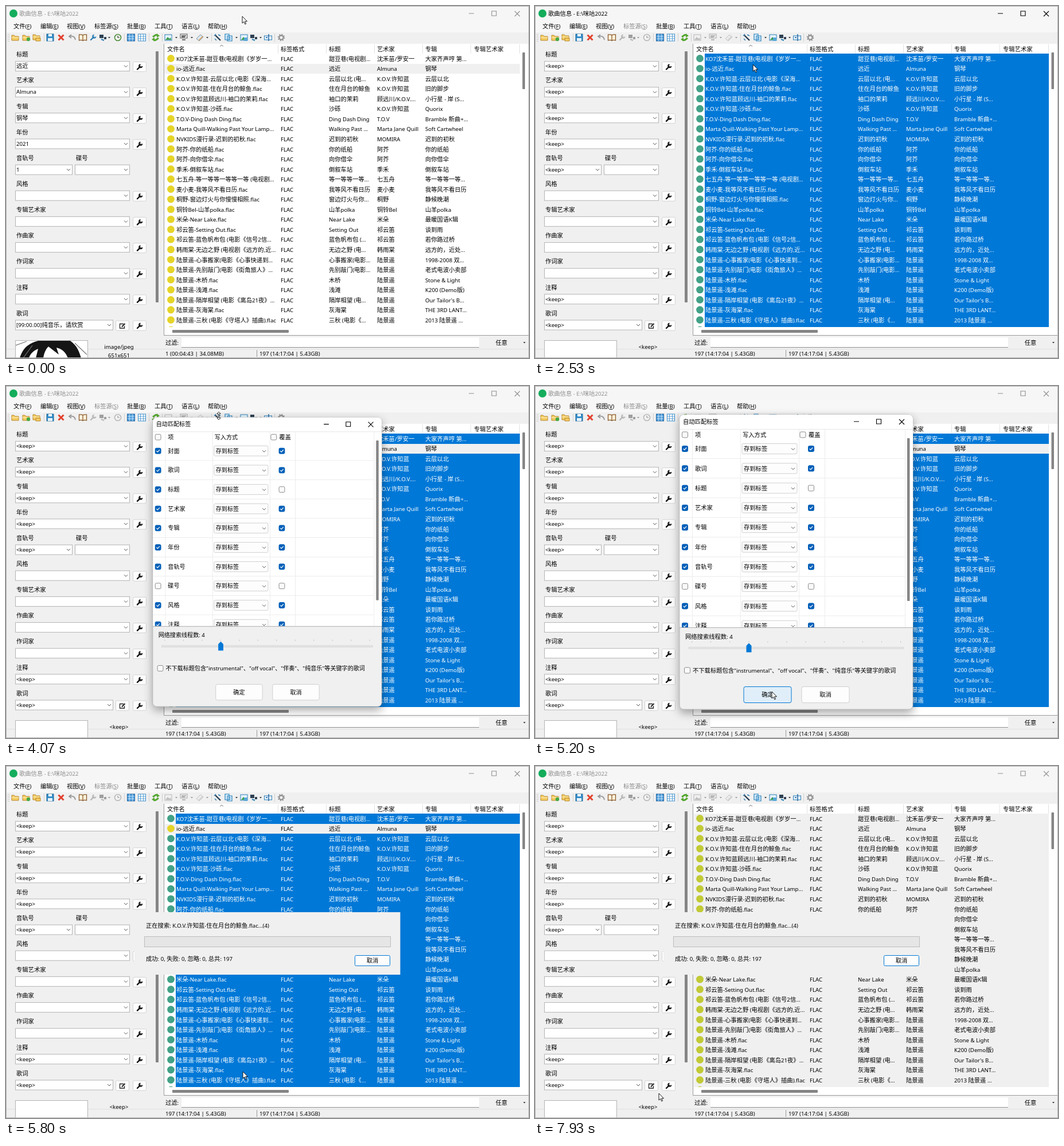
An HTML page for the animation above (8 s loop, 912 by 614 pixels).

```html
<!DOCTYPE html>
<html lang="zh">
<head>
<meta charset="utf-8">
<title>歌曲信息</title>
<style>
html,body{margin:0;width:100%;height:100%;overflow:hidden;background:#f0f0f0}
svg{display:block;width:912px;height:614px}
text{font:10.3px "Noto Sans CJK SC","Noto Sans CJK","Noto Sans",sans-serif;white-space:pre;fill:currentColor}
.l{font-family:"Noto Sans",sans-serif;font-size:9.65px}
.u{text-decoration:underline}
.mid{text-anchor:middle}
.bg{fill:none;shape-rendering:crispEdges}
.bg.sel{fill:#0078d7}
.bg.dim{fill:#f0f0f0;x:277px;width:619px}
.row{color:#000}
.row.sel{color:#fff}
.dot{fill:#e6d428}
.late .dot{fill:#c2ca35}
.sel .dot{fill:#43a287}
.off .can{filter:grayscale(1);opacity:.45}
.box{fill:#fdfdfd;stroke:#cfcfcf}
.hot{fill:#e0eef9;stroke:#0078d4}
.down{fill:#cce4f7;stroke:#005499}
</style>
</head>
<body>
<svg id="stage" viewBox="0 0 912 614" xmlns="http://www.w3.org/2000/svg"></svg>
<script>
const BLUE = '#0078d7';
const esc = s => s.replace(/&/g, '&amp;').replace(/</g, '&lt;').replace(/>/g, '&gt;');
const rect = (x, y, w, h, fill, more = '') => `<rect x="${x}" y="${y}" width="${w}" height="${h}" fill="${fill}" ${more}/>`;
const path = (d, stroke, width = 1, fill = 'none', more = '') => `<path d="${d}" stroke="${stroke}" stroke-width="${width}" fill="${fill}" ${more}/>`;
const group = (x, y, body, more = '') => `<g transform="translate(${x} ${y})" ${more}>${body}</g>`;
// y is the middle of the line; Latin runs get their own size
const text = (x, y, s, more = '') => `<text x="${x}" y="${y + 3.7}" ${more}>` +
  s.replace(/[ -~]+/g, m => `<tspan class="l">${esc(m)}</tspan>`)
   .replace(/_(\w)/, '<tspan class="u">$1</tspan>') + '</text>';
const framed = (x, y, w, h, more = '') => rect(x + .5, y + .5, w - 1, h - 1, '#fff', 'stroke="#b4b4b4" ' + more);
const chevron = (x, y, c = '#555') => group(x, y, path('M-3-1.5L0 1.5L3-1.5', c));
const caret = x => group(x, 55, path('M-2-1H2L0 1.4Z', 'none', 0, '#333'));
const winButtons = (x, gap, y) => path(
  `M${x} ${y}h9M${x + gap} ${y - 4}h8v8h-8ZM${x + 2 * gap} ${y - 4}l9 9m0-9l-9 9`, 'currentColor', 1.1);
const wrench = c => path('M-4 4L1-1', c, 2.4, 'none', 'stroke-linecap="round"') +
  path('M1.5-4.4A2.6 2.6 0 1 0 4.4-1.5', c, 2);

// ---------- song list ----------
const K = 'K.O.V.许知蓝', L = '陆景遥', Q = '祁云笛';
const songs = [
  ['KO7沈禾苗-甜豆巷(电视剧《岁岁一...', '甜豆巷(电视剧...', '沈禾苗/罗安一', '大家齐声哼 第...'],
  ['io-远近.flac', '远近', 'Almuna', '钢琴'],
  [K + '-云层以北 (电影《深海...', '云层以北 (电...', K, '云层以北'],
  [K + '-住在月台的鲸鱼.flac', '住在月台的鲸鱼', K, '旧的脚步'],
  [K + '顾远川-袖口的茉莉.flac', '袖口的茉莉', '顾远川/K.O.V....', '小行星 - 岸 (S...'],
  [K + '-沙砾.flac', '沙砾', K, 'Quorix'],
  ['T.O.V-Ding Dash Ding.flac', 'Ding Dash Ding', 'T.O.V', 'Bramble 新曲+...'],
  ['Marta Quill-Walking Past Your Lamp...', 'Walking Past ...', 'Marta Jane Quill', 'Soft Cartwheel'],
  ['NVKIDS漫行录-迟到的初秋.flac', '迟到的初秋', 'MOMIRA', '迟到的初秋'],
  ['阿芥-你的纸船.flac', '你的纸船', '阿芥', '你的纸船'],
  ['阿芥-向你借伞.flac', '向你借伞', '阿芥', '向你借伞'],
  ['季禾-倒叙车站.flac', '倒叙车站', '季禾', '倒叙车站'],
  ['七五舟-等一等等一等等一等 (电视剧...', '等一等等一等...', '七五舟', '等一等等一等...'],
  ['麦小麦-我等风不看日历.flac', '我等风不看日历', '麦小麦', '我等风不看日历'],
  ['桐野-窗边灯火与你慢慢相照.flac', '窗边灯火与你...', '桐野', '静候晚潮'],
  ['铜铃Bel-山羊polka.flac', '山羊polka', '铜铃Bel', '山羊polka'],
  ['米朵-Near Lake.flac', 'Near Lake', '米朵', '最暖国语K辑'],
  [Q + '-Setting Out.flac', 'Setting Out', Q, '谈到雨'],
  [Q + '-蓝色帆布包 (电影《信号2信...', '蓝色帆布包 (...', Q, '若你路过桥'],
  ['韩雨棠-无边之野 (电视剧《远方的,近...', '无边之野 (电...', '韩雨棠', '远方的，近处...'],
  [L + '-心事搬家(电影《心事快递到...', '心事搬家(电影...', L, '1998-2008 双...'],
  [L + '-先别敲门(电影《街角旅人》...', '先别敲门(电影...', L, '老式电波小卖部'],
  [L + '-木桥.flac', '木桥', L, 'Stone & Light'],
  [L + '-浅滩.flac', '浅滩', L, 'K200 (Demo版)'],
  [L + '-隔岸相望 (电影《离岛21夜》...', '隔岸相望 (电...', L, "Our Tailor's B..."],
  [L + '-灰海棠.flac', '灰海棠', L, 'THE 3RD LANT...'],
  [L + '-三秋 (电影《守塔人》插曲).flac', '三秋 (电影《...', L, '2013 ' + L + ' ...'],
  ['', '', '', '']
];
const STEP = 17.54, rowY = i => 92 + STEP * i;

function songList() {
  const cols = [281, 479, 563, 647, 731, 816];
  const heads = ['文件名', '标签格式', '标题', '艺术家', '专辑', '专辑艺术家'];
  let bgs = '', rows = '';
  songs.forEach(([file, ...rest], i) => {
    const y = rowY(i);
    bgs += `<rect class="bg" x="296" y="${y - 8.8}" width="600" height="${STEP}"/>`;
    const cells = file ? ['FLAC', ...rest].map((s, c) => text(cols[c + 1], y, s)).join('') : '';
    rows += `<g class="row"><circle class="dot" cx="287.5" cy="${y - .5}" r="6.4"/>${text(297, y, file)}${cells}</g>`;
  });
  return rect(276, 66, 636, 509, '#fff') + path('M275.5 66V574.5H911', '#9a9a9a') +
    heads.map((s, i) => text(cols[i], 75, s)).join('') +
    path('M474.5 67V83M558.5 67V83M642.5 67V83M726.5 67V83M810.5 67V83M895.5 67V83', '#e2e2e2') +
    path('M373 70.5l3-2.5l3 2.5', '#777') +
    `<g clip-path="url(#listClip)"><g id="bgs">${bgs}</g>` +
    rect(277, 0, 198, STEP, '#d9ecfb', 'id="hover"') + `<g id="rows">${rows}</g></g>` +
    `<g id="edit">${rect(297.5, 102, 62, 15, '#fff', 'stroke="#555"')}${rect(299, 103.5, 35, 12, BLUE)}` +
    `<g color="#fff">${text(298, 109.5, 'io-远近')}</g>${text(333, 109.5, '.flac')}</g>` +
    rect(900.5, 81, 4.5, 64, '#858585', 'rx="1"') + rect(290, 565, 203, 5, '#858585', 'rx="1"');
}

// ---------- left panel ----------
const fieldY = i => 104.5 + 45.15 * i;
function panel() {
  const labels = ['标题', '艺术家', '专辑', '年份', '音轨号', '风格', '专辑艺术家', '作曲家', '作词家', '注释', '歌词'];
  const single = ['远近', 'Almuna', '钢琴', '2021', '1', '', '', '', '', '', '[99:00.00]纯音乐，请欣赏'];
  const kept = [0, 1, 2, 3, 4, 9, 10];
  const button = (x, y, body) => rect(x + .5, y - 8, 23, 17, '#fdfdfd', 'rx="2" stroke="#d3d3d3"') + group(x + 12, y + 1, body);
  const combo = (x, y, w) => framed(x, y - 8.5, w, 18) + chevron(x + w - 7, y + .5);
  let s = '', one = '', many = '';
  labels.forEach((name, i) => {
    const y = fieldY(i);
    s += text(18, y - 20, name) + combo(16, y, i == 4 ? 100 : i == 10 ? 171 : 200);
    if (i == 4) s += text(122, y - 20, '碟号') + combo(120, y, 96);
    else s += button(221, y + 1, wrench('#111'));
    one += text(18, y, single[i]);
    if (kept.includes(i)) many += text(18, y, '<keep>');
  });
  s += button(191, fieldY(10) + 1, path('M2-3.5H-4.5V4H3.5V0', '#222', 1.3) + path('M-1 1.5L4.5-4', '#222', 2));
  s += framed(16, 583, 127, 40);
  one += '<g clip-path="url(#coverClip)">' +
    path('M24 614C30 594 42 588 56 584H112C124 592 128 604 131 614H108C104 604 98 598 88 596L92 608L74 594C68 600 66 608 65 614H52L56 598C46 602 42 608 40 614Z', 'none', 0, '#151515') +
    path('M17 592L36 585M120 588L141 608M30 614L46 592', '#777', 1.2) + '</g>' +
    text(197, 594, 'image/jpeg', 'class="mid"') + text(197, 609, '651x651', 'class="mid"') + text(278, 606, '1 (00:04:43 | 34.08MB)');
  many += text(197, 594, '<keep>', 'class="mid"') + text(278, 606, '197 (14:17:04 | 5.43GB)');
  return s + `<g id="one">${one}</g><g id="many">${many}</g>` + rect(261, 79, 5, 438, '#858585', 'rx="1"');
}

// ---------- title, menu, toolbar, status ----------
function chrome() {
  const menus = [[13, '文件(_F)'], [60, '编辑(_E)'], [106, '视图(_V)'], [154, '标签源(_S)'], [211, '批量(_B)'],
    [259, '工具(_T)'], [306, '语言(_L)'], [352, '帮助(_H)']];
  const folder = path('M-6-4H-2L0-2H6V5H-6Z', '#b8862b', 1, '#f4cd62') + path('M-6 0H6', '#fff2c4');
  const grid = (bg, c) => rect(-6.5, -6, 13, 12, bg, `stroke="${c}"`) +
    path('M-6-2H6M-6 2H6M-2.5-6V6M2.5-6V6', bg == '#fff' ? c : '#d8ebfb', .8);
  const picture = rect(-6, -5, 12, 10, '#e7f4fd', 'stroke="#2d7fb5"') + path('M-5 4L-1-1L2 2L4 0L5 4Z', 'none', 0, '#3f9d52');
  const flags = path('M-7-5H0V1H-7ZM1-1H5V3H1Z', 'none', 0, '#2f4254') + path('M-4 3L1 5', '#2d7fb5', 2);
  const pages = path('M-6-6H1V4H-6ZM-2-3H6V6H-2Z', '#2580bd', 1.2, '#dff0fb') + path('M0 0H4M0 3H4', '#2580bd');
  const icons = [
    [16, folder], [35, folder + `<circle cx="4" cy="3" r="3.2" fill="#45a845"/>`],
    [54, group(-1, -1, folder) + path('M-2 1H6V6H-2Z', '#b8862b', 1, '#f4cd62')],
    [77, rect(-6, -6, 12, 12, '#358dc9', 'stroke="#1c6797"') + rect(-3, -6, 6, 4, '#fff') + rect(-4, 1, 8, 5, '#e6f2fa')],
    [96, path('M-4.5-4.5L4.5 4.5M4.5-4.5L-4.5 4.5', '#e2412d', 3)],
    [115, path('M6 4C5-2 1-3-4-2M-1-5L-5-2L-1 1', '#9a9a9a', 1.8)],
    [134, path('M0-4C-2-6-5-5-6.5-5V5C-4 4-2 4 0 5.5C2 4 4 4 6.5 5V-5C5-5 2-6 0-4ZV5', '#8a5a2c', 1.3, '#fff3dc')],
    [152, wrench('#2d7fb5'), 1], [170, flags, 1],
    [195, `<circle r="5.5" fill="#f2f8ee" stroke="#4d8a3c" stroke-width="1.6"/>` + path('M0-3V0H3', '#333', 1.2), 1],
    [218, grid('#4d9ddb', '#1b5f9e')], [237, grid('#fff', '#3a8ecb')],
    [261, path('M-5-1L0-4.5H3M5 1L0 4.5H-3', '#55a630', 3) + path('M2-7L7-3L2 0ZM-2 7L-7 3L-2 0Z', 'none', 0, '#55a630')],
    [283, picture, 1],
    [310, rect(-6, -6, 12, 7, '#eee', 'stroke="#555"') + path('M-4-3H4M-4-1H2M-3 4H3', '#444', 1.4), 1],
    [338, path('M-6 2L1-5L6-1L-1 6Z', '#7b8fa2', 1, '#dbe8f2') + path('M-2 5L5-2', '#e09a4d', 1.5), 1],
    [369, path('M-4-4L5 5', '#2b3d50', 2.4) + path('M-5 2L-2 5M1-5L5-3M-6-3L-3-6', '#2d7fb5', 1.4)],
    [388, pages], [415, picture + rect(0, 0, 6, 6, '#58a8d8')], [433, flags],
    [457, rect(-6.5, -3, 13, 7, '#e7f4fd', 'stroke="#2d7fb5"') + path('M1-6V6M-4 0H-1', '#1b5f9e', 1.4)],
    [480, `<circle r="3.6" fill="none" stroke="#888" stroke-width="2"/><circle r="5.4" fill="none" stroke="#888" stroke-width="1.6" stroke-dasharray="2.1 2.1"/>`]
  ];
  return rect(0, 0, 912, 25, '#f6f6f6') + `<circle cx="13" cy="13" r="7" fill="#14ad5c"/>` +
    `<g id="title">${text(23, 13, '歌曲信息 - E:\\咪咕2022')}${winButtons(807, 40, 13)}</g>` +
    rect(0, 25, 912, 21, '#f7f7f7') + menus.map(([x, s], i) => text(x, 35.5, s, i == 3 ? 'class="can"' : '')).join('') +
    path('M3.5 49V62M5.5 49V62', '#b5b5b5', 1, 'none', 'stroke-dasharray="1 2"') +
    path('M66.5 48V62M206.5 48V62M249.5 48V62M272.5 48V62M358.5 48V62M468.5 48V62', '#d0d0d0') +
    rect(360.5, 46.5, 18, 17, '#bfdef5', `stroke="${BLUE}" id="press"`) +
    icons.map(([x, body, can]) => group(x, 55, body, can ? 'class="can"' : '')).join('') +
    [180, 297, 324, 351].map(x => `<g class="can">${caret(x)}</g>`).join('') + caret(402) + caret(444) +
    text(278, 587, '过滤:') + rect(306, 578, 519, 17, '#fff') + path('M306 595.5H825', '#8d8d8d') +
    text(864, 587, '任意', 'class="mid"') + group(904, 587, path('M-2-1H2L0 1.5Z', 'none', 0, '#333')) +
    path('M0 598.5H912', '#e0e0e0') + text(442, 606, '197 (14:17:04 | 5.43GB)') + path('M437.5 600V612', '#999');
}

// ---------- dialogs ----------
const itemY = i => 109.5 + 34.3 * i;
function matchDialog() {
  const check = (x, y, on) => rect(x - 5, y - 5, 10, 10, on ? '#005fb8' : '#fafafa', `rx="2" stroke="${on ? '#005fb8' : '#8a8a8a'}"`) +
    (on ? path(`M${x - 2.8} ${y}l2 2l3.6-4`, '#fff', 1.2) : '');
  const items = ['封面', '歌词', '标题', '艺术家', '专辑', '年份', '音轨号', '碟号', '风格', '注释'];
  const rows = items.map((s, i) => {
    const y = itemY(i);
    return path(`M252 ${y + 17}H645`, '#ececec') + check(261.5, y, i != 7) + text(279, y, s) +
      `<rect class="box" x="361" y="${y - 9}" width="96" height="18" rx="2"/>` + text(364, y, '存到标签') +
      chevron(450, y + .5) + check(481.5, y, i != 2 && i != 7);
  }).join('');
  const ticks = Array.from({length: 12}, (_, i) => `M${273.5 + 33.1 * i} 445v2.5`).join('');
  const button = (x, s) => `<rect class="box" x="${x}" y="524.5" width="83" height="28" rx="3"/>` + text(x + 41.5, 538.5, s, 'class="mid"');
  return rect(252, 50, 407, 514, '#f0f0f0', 'rx="7" filter="url(#shade)" stroke="#9b9b9b" stroke-width=".7"') +
    path('M252.5 421V57a7 7 0 0 1 7-7H652a7 7 0 0 1 7 7V421Z', 'none', 0, '#fff') +
    text(258, 62, '自动匹配标签') + winButtons(556, 39.5, 62) +
    path('M252 75.5H659', '#e6e6e6') + path('M274.5 76V421M358.5 76V421M460.5 76V421M505.5 76V421M645.5 76V421', '#ececec') +
    check(261.5, 85, 0) + text(279, 85, '项') + text(362, 85, '写入方式') + check(467, 85, 0) + text(477, 85, '覆盖') +
    `<g id="items" clip-path="url(#itemClip)">${rows}</g>` + rect(649, 91, 4.5, 284, '#858585', 'rx="1"') +
    path('M252 421.5H659', '#b0b0b0') + text(262, 437, '网络搜索线程数: 4') +
    path(ticks, '#c4c4c4') + rect(268, 455.5, 375, 3, '#e3e3e3', 'stroke="#d2d2d2" stroke-width=".6"') +
    path('M368.5 464.5V453L373 448.5L377.5 453V464.5Z', 'none', 0, BLUE) +
    check(265.5, 496, 0) + text(275, 496, '不下载标题包含"instrumental"、"off vocal"、"伴奏"、"纯音乐"等关键字的歌词') +
    `<g id="ok">${button(364, '确定')}</g>` + button(465, '取消');
}
function searchDialog() {
  return rect(224, 255, 463.5, 109, '#f0f0f0') + text(244, 278, `正在搜索: ${songs[3][0]}...(4)`) +
    rect(241.5, 297.5, 429, 18, '#e6e6e6', 'stroke="#bcbcbc"') + text(244, 336, '成功: 0, 失败: 0, 忽略: 0, 总共: 197') +
    rect(608.5, 330.5, 61, 18, '#fdfdfd', `rx="2" stroke="${BLUE}"`) + text(639, 339.5, '取消', 'class="mid"');
}

const stage = document.getElementById('stage');
const clip = (id, x, y, w, h) => `<clipPath id="${id}">${rect(x, y, w, h, '#000')}</clipPath>`;
stage.innerHTML = '<defs><filter id="shade" x="-20%" y="-20%" width="140%" height="140%">' +
  '<feDropShadow dx="0" dy="6" stdDeviation="8" flood-opacity=".35"/></filter>' +
  clip('listClip', 276, 83, 621, 477) + clip('coverClip', 17, 584, 125, 30) + clip('itemClip', 252, 76, 393, 345) + '</defs>' +
  rect(0, 0, 912, 614, '#f0f0f0') + `<g id="main">${chrome()}${songList()}${panel()}</g>` +
  rect(.5, .5, 911, 613, 'none', 'stroke="#b3b3b3"') +
  `<g id="tip">${rect(373.5, 75.5, 82, 16, '#f9f9f9', 'stroke="#d0d0d0" rx="2"')}<g color="#555">${text(378, 83.5, '自动匹配标签(A)')}</g></g>` +
  `<g id="match">${matchDialog()}</g><g id="search">${searchDialog()}</g>` +
  `<g id="arrow">${path('M0 0V12L2.8 9.4L4.8 13.8L6.6 13L4.7 8.8H8.5Z', '#000', .9, '#fff')}</g>` +
  `<g id="resize">${path('M0-7L3.2-3.6H.9V3.6H3.2L0 7L-3.2 3.6H-.9V-3.6H-3.2Z', '#000', .8, '#fff')}</g>`;

// ---------- motion ----------
const $ = id => document.getElementById(id);
const bgs = [...$('bgs').children], rows = [...$('rows').children];
const combos = [...$('items').querySelectorAll('.box')], okBox = $('ok').firstChild;
const track = [[0, 412, 18], [470, 412, 18], [800, 404, 60], [1050, 390, 98], [1270, 381, 114], [2400, 381, 114],
  [2870, 378, 71], [3070, 373, 52], [3270, 369, 46], [4400, 370, 46], [4650, 373, 130], [5000, 402, 440], [5200, 413, 533],
  [6530, 413, 533], [6600, 412, 534], [6800, 412, 534], [7200, 385, 555], [7600, 335, 560], [7930, 216, 571], [8000, 216, 571]];
const clamp = v => Math.max(0, Math.min(1, v));
const within = (t, a, b) => t >= a && t < b;
const show = (id, on) => $(id).style.display = on ? '' : 'none';

function cursorAt(t) {
  const i = track.findIndex(k => k[0] > t);
  const [t0, x0, y0] = track[i - 1], [t1, x1, y1] = track[i];
  const p = (t - t0) / (t1 - t0);
  return [x0 + (x1 - x0) * p, y0 + (y1 - y0) * p];
}
// open and close like a system window: grow in, shrink out
function popup(id, t, open, close, cx, cy, grow) {
  show(id, within(t, open, close));
  const left = 1 - clamp((t - open) / grow), out = clamp((t - close + 60) / 60);
  const k = 1 - .07 * left ** 3 - .05 * out;
  $(id).setAttribute('transform', `translate(${cx} ${cy}) scale(${k}) translate(${-cx} ${-cy})`);
  $(id).setAttribute('opacity', Math.min(1, .4 + 2 * (1 - left)) * (1 - .6 * out));
}
function rowState(i, t) {
  if (t >= 5930) return 'dim';
  if (t >= 2070) return i == 1 && t >= 4000 ? 'dim' : 'sel';
  return i != 1 ? '' : t >= 1330 ? 'sel' : 'dim';
}
function draw(t) {
  const [x, y] = cursorAt(t), all = t >= 2070;
  $('title').setAttribute('color', within(t, 1330, 3870) || within(t, 5470, 5670) ? '#000' : '#8f8f8f');
  $('main').setAttribute('class', all ? 'off' : '');
  $('rows').setAttribute('class', t >= 5930 ? 'late' : '');
  rows.forEach((row, i) => {
    const state = rowState(i, t);
    row.setAttribute('class', 'row ' + state);
    bgs[i].setAttribute('class', 'bg ' + state);
  });
  show('one', !all);
  show('many', all);
  show('hover', t < 1330 && y > 83);
  $('hover').setAttribute('y', rowY(Math.round((y - 92) / STEP)) - 8.8);
  show('edit', within(t, 3270, 4000));
  show('press', within(t, 3270, 4000));
  show('tip', within(t, 3470, 4000));
  $('tip').setAttribute('opacity', clamp((t - 3410) / 260) * (t < 3870 ? 1 : .25));
  popup('match', t, 4000, 5530, 455.5, 307, 200);
  popup('search', t, 5670, 8060, 455.5, 309, 130);
  combos.forEach((box, i) => box.setAttribute('class', within(t, 4400, 5200) && Math.abs(y - itemY(i)) < 9 ? 'box hot' : 'box'));
  okBox.setAttribute('class', 'box' + (t >= 5470 ? ' down' : t > 4400 && y > 525 ? ' hot' : ''));
  const sizing = within(t, 4000, 4400);
  show('arrow', !sizing);
  show('resize', sizing);
  $('arrow').setAttribute('transform', `translate(${x} ${y})`);
  $('resize').setAttribute('transform', 'translate(371 52)');
}
const start = performance.now();
function tick() {
  draw((performance.now() - start) % 8000);
  requestAnimationFrame(tick);
}
tick();
</script>
</body>
</html>
```
